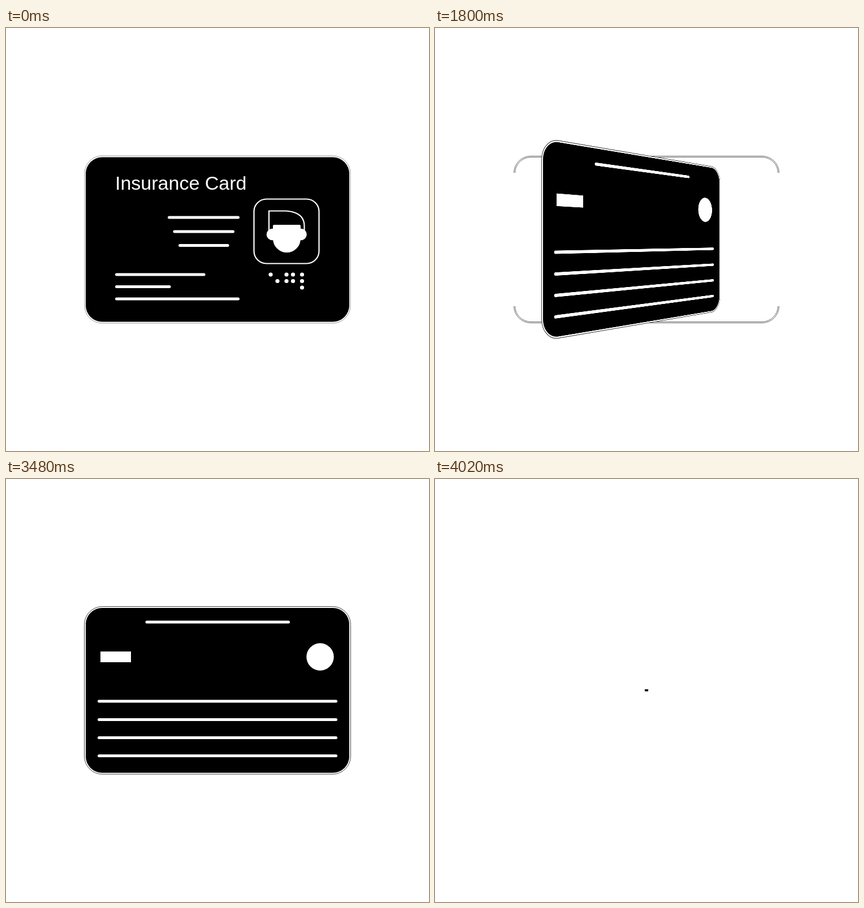
Recreate the animation shown at these times as an HTML page. Size 748 by 748 pixels, loop 4050 ms.

```html
<!DOCTYPE html>
<html lang="en">
<head>
<meta charset="utf-8">
<title>Insurance card</title>
<style>
  html, body { margin: 0; width: 100%; height: 100%; overflow: hidden; background: #fff; }
  svg { position: absolute; left: 0; top: 0; width: 748px; height: 748px; transform-origin: 374px 373.7px; }
  .edge { fill: #fff; stroke: #444; stroke-width: 1; }
  .rest .edge { stroke: #999; }
  .crisp .edge { stroke: #000; }
  .line { fill: none; stroke: #fff; stroke-width: 5; stroke-linecap: round; }
  .thin { fill: none; stroke: #fff; stroke-width: 2.2; }
  .ink { fill: #fff; }
  text { font: 34px "Liberation Sans", Arial, sans-serif; fill: #fff; }
  #trace path { fill: none; stroke: #444; stroke-width: .8; }
</style>
</head>
<body>
<svg id="trace" viewBox="0 0 748 748">
  <path d="M139.5 256A30 30 0 0 1 169 226.5H579A30 30 0 0 1 608.5 256M139.5 492A30 30 0 0 0 169 521.5H579A30 30 0 0 0 608.5 492"/>
  <path d="M141.5 256A28 28 0 0 1 169 228.5H579A28 28 0 0 1 606.5 256M141.5 492A28 28 0 0 0 169 519.5H579A28 28 0 0 0 606.5 492"/>
</svg>

<svg id="front" viewBox="0 0 748 748">
  <rect class="edge" x="139" y="226" width="470" height="296" rx="31"/>
  <rect x="141" y="228.5" width="466" height="291" rx="29"/>
  <text x="193" y="286">Insurance Card</text>
  <path class="line" d="M288.5 335H410.5M298 360H401.5M307.5 384.5H392M195.5 436H350M195.5 457.5H289M195.5 479H410.5"/>
  <rect class="thin" x="438.5" y="302.5" width="115" height="114" rx="22"/>
  <path class="thin" d="M465 358V323.5H496Q527.5 326 527.5 350V358"/>
  <path class="ink" d="M472 350Q472 348 474 348H519Q521 348 521 350V372.5A24.5 24.5 0 0 1 472 372.5Z"/>
  <circle class="ink" cx="471" cy="365" r="10.3"/>
  <circle class="ink" cx="521.5" cy="365" r="10.3"/>
  <g id="dots" class="ink"></g>
</svg>

<svg id="back" viewBox="0 0 748 748">
  <rect class="edge" x="138.5" y="225.5" width="471" height="296.5" rx="32"/>
  <rect x="141" y="228" width="466" height="291.5" rx="29"/>
  <path class="line" d="M249 253H499.5M164.5 393H583.5M164.5 425.5H583.5M164.5 457.5H583.5M164.5 489.5H583.5"/>
  <rect class="ink" x="167" y="305" width="54" height="19"/>
  <circle class="ink" cx="555.5" cy="314.5" r="24.2"/>
</svg>

<script>
const LOOP = 4050, STEP = 30;
const FLIP = 1650, LAND = 2460, SHRINK = 3480;
const [trace, front, back, dots] =
  ["trace", "front", "back", "dots"].map(id => document.getElementById(id));

// Braille rows: y, then the x of each dot
for (const [y, ...xs] of [[436, 468, 496, 507.5, 523.5], [447.5, 480, 496, 507.5, 523.5], [459, 523.5]])
  dots.innerHTML += xs.map(x => `<circle cx="${x}" cy="${y}" r="3.6"/>`).join("");

const linear = p => p;
const out = p => 1 - (1 - p) ** 2;
const inOut = p => p * p * (3 - 2 * p);

// Time, turn of the back, tilt, scale, easing into this pose
const POSES = [
  [FLIP, 180, 0, 1],
  [1800, 49.5, 0, 1, linear],
  [2160, 14, 0, 1.06, out],
  [2310, -4, -10, 1.1, inOut],
  [LAND, 0, 0, 1, inOut]
];

function poseAt(t) {
  if (t <= FLIP) return [180, 0, 1];
  if (t >= LAND) return [0, 0, 1 - shrink((t - SHRINK) / (LOOP - SHRINK))];
  const i = POSES.findIndex(k => k[0] >= t);
  const a = POSES[i - 1], b = POSES[i];
  const p = b[4]((t - a[0]) / (b[0] - a[0]));
  return [1, 2, 3].map(j => a[j] + (b[j] - a[j]) * p);
}

// cubic-bezier(.916, 0, .709, 1)
function shrink(x) {
  if (x <= 0) return 0;
  let lo = 0, hi = 1;
  for (let i = 0; i < 24; i++) {
    const u = (lo + hi) / 2, v = 1 - u;
    if (3 * v * v * u * .916 + 3 * v * u * u * .709 + u ** 3 < x) lo = u;
    else hi = u;
  }
  return inOut(lo);
}

function place(side, turn, tilt, scale, shown) {
  side.style.visibility = shown ? "visible" : "hidden";
  const flat = `scale(${scale}) rotate(${tilt}deg)`;
  side.style.transform = turn ? `perspective(1024px) ${flat} rotateY(${turn}deg)` : flat;
}

function draw(now) {
  const t = Math.floor((now % LOOP) / STEP) * STEP;
  const [turn, tilt, scale] = poseAt(t);
  const showBack = turn < 90;
  place(front, turn - 180, tilt, scale, !showBack);
  place(back, turn, tilt, scale, showBack);
  front.classList.toggle("rest", t <= FLIP);
  back.classList.toggle("crisp", t >= LAND && t < SHRINK);
  trace.style.visibility = t > FLIP && t < LAND ? "visible" : "hidden";
}

const start = performance.now();
function tick() {
  draw(performance.now() - start);
  requestAnimationFrame(tick);
}
tick();
</script>
</body>
</html>
```
